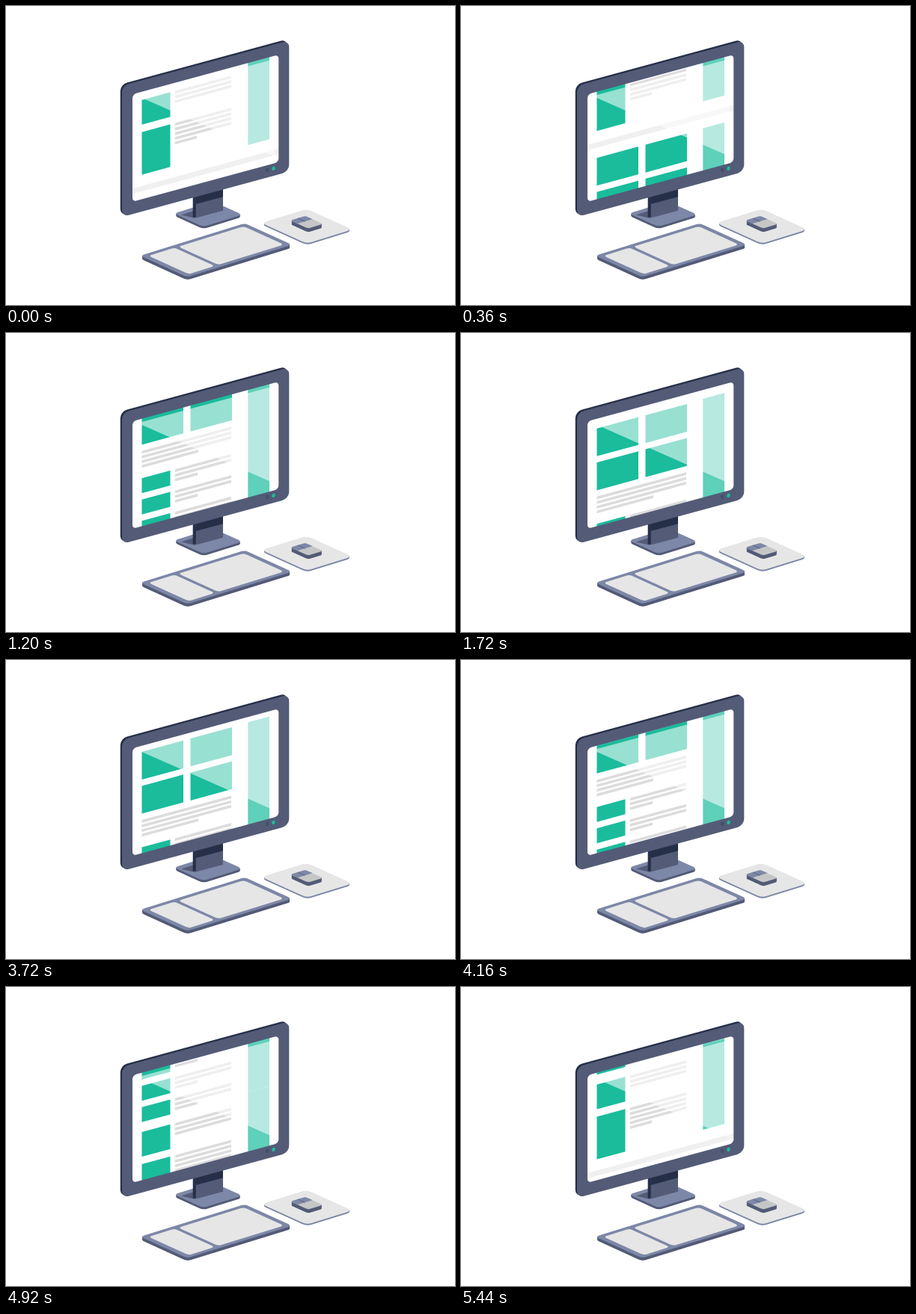
An HTML page with a canvas that plays this animation: 600 px wide and 400 px high, repeating every 5.48 s.

```html
<!DOCTYPE html>
<html lang="en">
<head>
<meta charset="utf-8">
<title>Scrolling desktop</title>
<style>
html, body { margin: 0; width: 100%; height: 100%; overflow: hidden; background: #fff; }
canvas { display: block; width: 600px; height: 400px; }
</style>
</head>
<body>
<canvas id="stage" width="600" height="400"></canvas>
<script>
const ctx = document.getElementById('stage').getContext('2d');
const LOOP = 5480, STEP = 40, HOLD_START = 1720, HOLD_END = 3720;
const SLOPE = 0.272;                  // rise of the upright faces
const RISE = 0.31, FALL = 0.455;      // the two directions of the desk plane
const PAGE_LENGTH = 354, REST = 127.8, LOW = 54.8, TRAVEL = 220;
const LEFT = 181.5, COLUMN = 225.8, RIGHT = 301;
const DARK = '#262f48', MID = '#535b77', LIGHT = '#7d87a7', PALE = '#e6e6e6';
const GREEN = '#1abc9c', SIDEBAR = '#5fd0ba', TEXT = '#dcdcdc', BAR = '#f0f0f0';

function box(color, x, y, w, h) {
  ctx.fillStyle = color;
  ctx.fillRect(x, y, w, h);
}

function triangle(color, ...points) {
  ctx.beginPath();
  points.forEach(p => ctx.lineTo(...p));
  ctx.fillStyle = color;
  ctx.fill();
}

// Upright face: horizontals rise to the right and are level at x = origin
function upright(origin, paint) {
  ctx.save();
  ctx.transform(1, -SLOPE, 0, 1, 0, SLOPE * origin);
  paint();
  ctx.restore();
}

// Desk plane with its left corner at (x, y)
function onDesk(x, y, paint) {
  ctx.save();
  ctx.transform(1, -RISE, 1, FALL, x, y);
  paint();
  ctx.restore();
}

function rounded(color, ...rects) {
  ctx.beginPath();
  rects.forEach(r => ctx.roundRect(...r));
  ctx.fillStyle = color;
  ctx.fill('evenodd');
}

function plate(x, y, w, d, radius, depth, top, side) {
  for (let dy = depth; dy >= 0; dy -= 0.5) {
    onDesk(x, y + dy, () => rounded(dy ? side : top, [0, 0, w, d, radius]));
  }
}

function textLines(x, y, count, shortRight) {
  for (let i = 0; i < count; i++) {
    const end = shortRight && i === count - 1 ? shortRight : RIGHT;
    box(TEXT, x, y + i * 6.2, end - x, 3.7);
  }
}

function entry(y, height, lines, shortRight) {
  box(GREEN, LEFT, y, 38, height);
  textLines(COLUMN, y, lines, shortRight);
}

function drawPage(y) {
  box(BAR, 165, y - 21, 204, 7.3);
  for (let i = 0; i < 4; i++) {
    box(GREEN, LEFT + (i % 2) * 65, y + (i >> 1) * 45.6, 55.5, 37.2);
  }
  textLines(LEFT, y + 91.2, 4, 257);
  for (let i = 0; i < 3; i++) entry(y + 127.7 + i * 28.5, 20, 3, 256);
  entry(y + 218, 33, 3);
  entry(y + 261, 57, 5, 255);
  box(SIDEBAR, 323.3, y - 1, 28.7, 203.9);
  box(SIDEBAR, 323.3, y + 203.05, 28.7, 113.9);
}

// Scrolls past the rest position, turns back, rests, then scrolls on
function pageTop(time) {
  if (time < HOLD_START) {
    return LOW + Math.abs(REST + 134 - 6.5 * time / STEP - LOW);
  }
  if (time < HOLD_END) return REST;
  const begin = HOLD_END - STEP;
  return REST - TRAVEL * (time - begin) / (LOOP - begin);
}

function drawScreen(time) {
  const top = pageTop(time);
  ctx.save();
  ctx.beginPath();
  upright(169, () => ctx.rect(166, 115, 202, 150));
  ctx.clip();
  box('#fff', 160, 50, 220, 220);
  upright(181, () => {
    for (let copy = -1; copy < 2; copy++) drawPage(top + copy * PAGE_LENGTH);
  });
  triangle('rgba(255,255,255,0.55)', [176, 120.4], [359.5, 70.7], [359.5, 201.4]);
  ctx.restore();
}

function drawStand() {
  plate(224.5, 277.5, 52, 39, 5, 3, LIGHT, MID);
  triangle(MID, [234, 279.5], [251, 274], [253, 284]);
  box(DARK, 249.7, 250, 4.3, 32.6);
  upright(253.7, () => {
    box(MID, 253.7, 250, 36.3, 33.5);
    box(DARK, 253.7, 250, 36.3, 15);
  });
}

function light(color, x, y) {
  ctx.beginPath();
  ctx.ellipse(x, y, 2.2, 2.7, 0.2, 0, Math.PI * 2);
  ctx.fillStyle = color;
  ctx.fill();
}

function drawMonitor(time) {
  upright(155, () => rounded(DARK, [152.8, 104.3, 223, 175.7, 9]));
  drawScreen(time);
  // The frame covers the edges of the page
  upright(155, () => rounded(MID,
    [155, 106.7, 223.3, 175.5, 9],
    [169, 122, 195.3, 143.7, 5]));
  light('#3f5068', 349.3, 219.3);
  light(GREEN, 357.5, 217.4);
}

function drawKeyboard() {
  const x = 179.3, y = 334;
  plate(x, y, 139.7, 63, 5, 4, LIGHT, MID);
  onDesk(x, y, () => rounded(PALE, [6.3, 4.8, 35, 53.6, 4], [46, 4.8, 87.5, 53.6, 4]));
}

function drawMouse() {
  plate(341.3, 290.3, 60.5, 60.5, 6, 2, PALE, LIGHT);
  plate(380, 287, 20, 23.5, 3, 5, '#c5c6c6', MID);
  onDesk(380, 287, () => {
    rounded(LIGHT, [0, 0, 20, 9.5, [3, 3, 0, 0]]);
    box(MID, 9.5, 0, 1, 9.5);
  });
}

function draw(elapsed) {
  const time = Math.floor((elapsed % LOOP) / STEP) * STEP;
  box('#fff', 0, 0, 600, 400);
  drawStand();
  drawMonitor(time);
  drawKeyboard();
  drawMouse();
}

let start;
function tick(now) {
  start ??= now;
  draw(Math.max(0, now - start));
  requestAnimationFrame(tick);
}
draw(0);
requestAnimationFrame(tick);
</script>
</body>
</html>
```
